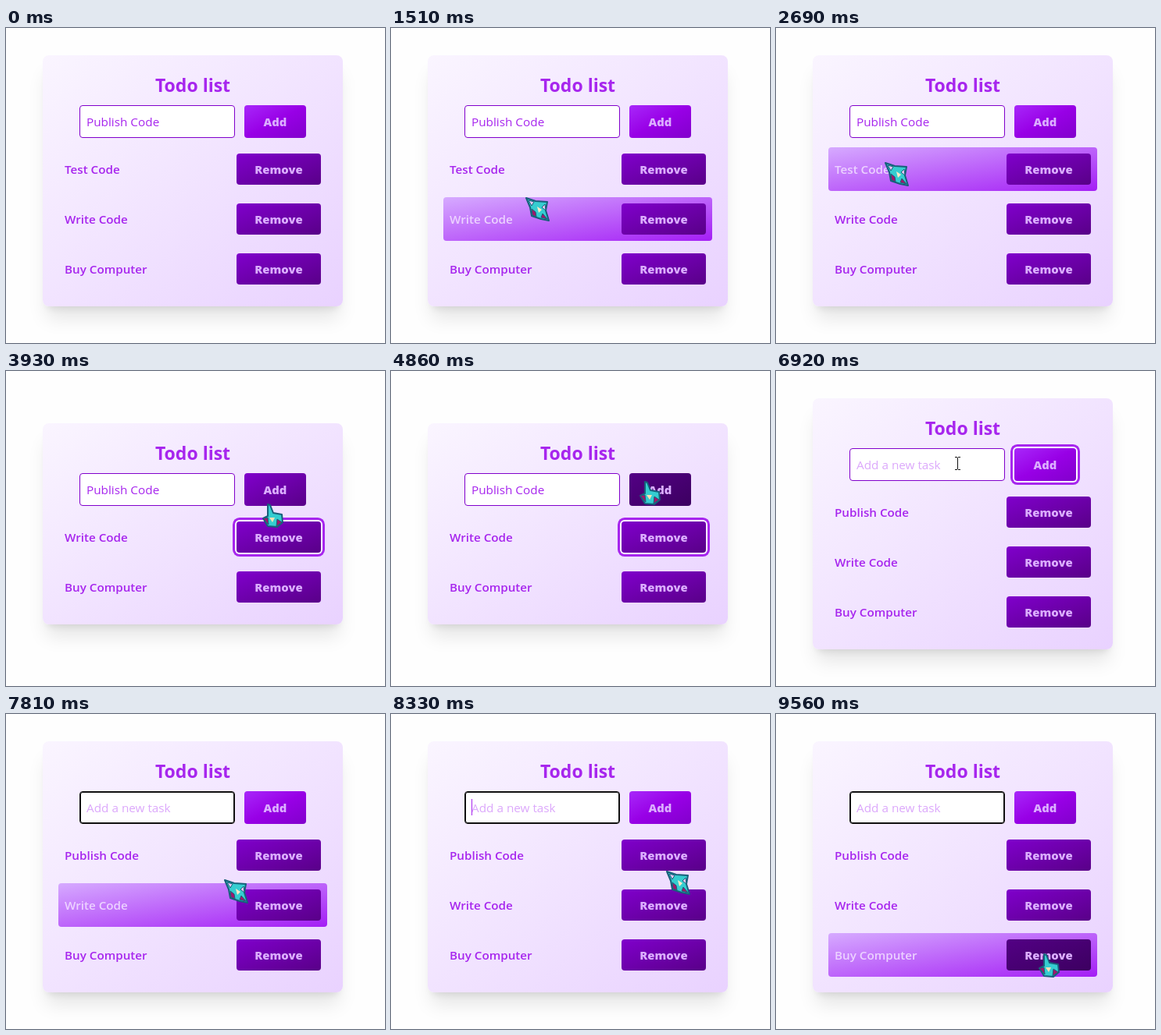
An HTML page for the animation above (9.86 s loop, 485 px wide and 404 px high).

```html
<!DOCTYPE html>
<html lang="en">
<head>
<meta charset="utf-8">
<title>Todo list</title>
<style>
html, body { margin: 0; width: 100%; height: 100%; overflow: hidden; background: #fefefe; }
body { position: relative; font: 600 15.2px "Open Sans", "Noto Sans", sans-serif; color: #a726ee; cursor: none; }
#card { position: absolute; left: 47px; width: 384px; border-radius: 8px;
  background: linear-gradient(to bottom right, #faf5ff, #e9d2ff);
  box-shadow: 0 20px 25px -5px rgba(0,0,0,.1), 0 8px 10px -6px rgba(0,0,0,.1); }
#card * { position: absolute; box-sizing: border-box; white-space: nowrap; }
h1 { margin: 0; top: 18px; width: 100%; line-height: 40px; text-align: center; font-size: 23px; font-weight: 700; }
#field { left: 47px; top: 64px; width: 199px; height: 42px; padding-left: 8px; line-height: 40px;
  border: 1px solid #8000cc; border-radius: 4px; background: #fff; font-size: 15.3px; font-weight: 400; }
#field.empty { color: #dca8fb; }
#field.focus { border-color: #101010; box-shadow: inset 0 0 0 1px #101010; }
.btn { border-radius: 4px; text-align: center; font-size: 14.8px; font-weight: 800; color: #dbaeff;
  background: linear-gradient(to bottom right, #8000cc, #590088); }
.btn.hover { background: linear-gradient(to bottom right, #530085, #3c0060); }
.btn.off { background: linear-gradient(to bottom right, #a827fa, #9800e6 50%, #8200cc); }
.btn.ring { box-shadow: 0 0 0 2px #fff, 0 0 0 5px #a726ee; }
#add { left: 258px; top: 64px; width: 79px; height: 42px; line-height: 43px; }
.row { left: 20px; width: 344px; height: 56px; border-radius: 4px; line-height: 56px; }
.row.hover { background: linear-gradient(to bottom right, #d6aaff, #a41ef5); color: #ecd2ff; }
.label { left: 8px; }
.row .btn { left: 228px; top: 8px; width: 108px; height: 40px; line-height: 41px; }
#caret { position: absolute; width: 1px; height: 21px; background: currentColor; pointer-events: none; }
#cursor { position: absolute; left: 0; top: 0; overflow: visible; pointer-events: none; }
</style>
</head>
<body>
<div id="card">
  <h1>Todo list</h1>
  <div id="field"></div>
  <div id="add" class="btn">Add</div>
</div>
<div id="caret"></div>
<svg id="cursor" width="32" height="32">
  <g id="arrow" transform="translate(-9 -9)" stroke="#17607a" stroke-linejoin="round">
    <path d="M1 1L13 5L28 6L26 17L30 30L20 28L8 24L6 13Z" fill="#35cdd0" stroke-width="2"/>
    <path d="M4 4L11 6L8 11ZM25 9L26 17L21 13Z" fill="#e6c8f4"/>
    <path d="M8 15L13 19L14 25L9 23ZM22 21L28 28L20 26Z" fill="#a3166a"/>
    <path d="M15 12L21 16L17 20Z" fill="#ffe9c4" stroke="none"/>
  </g>
  <g id="hand" transform="translate(-9 -9)" stroke="#17607a" stroke-linejoin="round">
    <path d="M8 1L11 2L15 12L26 14L27 24L20 30L8 29L2 19L8 16Z" fill="#35cdd0" stroke-width="2"/>
    <path d="M2 19L8 18L9 27ZM20 20L26 24L19 29Z" fill="#a3166a"/>
    <path d="M10 18L17 18L14 24Z" fill="#ffe2b4" stroke="none"/>
  </g>
  <path id="beam" d="M-3 -7.5H0M1 -7.5H4M.5 -7V8M-3 8.5H0M1 8.5H4" stroke="#111" fill="none"/>
</svg>
<script>
const LOOP = 9860, ENTER = 560, REMOVED = 3770, ADDED = 5300, FOCUSED = 7060;
const BLINK = 500, EDITED = 2730;
const $ = id => document.getElementById(id);
const card = $('card'), field = $('field'), add = $('add'), caret = $('caret'), cursor = $('cursor');

// Where the mouse rests: arrival, departure, x, y
const stops = [
  [0, ENTER, 500, 272],
  [1090, 1270, 190, 190],
  [1510, 1510, 181, 226],
  [1770, 2240, 185, 208],
  [EDITED, EDITED, 147, 181],
  [3030, 3960, 336, 179],
  [4860, 5400, 326, 150],
  [5790, 6180, 238, 126],
  [6560, 6560, 190, 230],
  [6920, 7530, 232, 118],
  [8080, 8080, 340, 318],
  [8330, 8520, 361, 210],
  [9230, LOOP, 344, 316]
];

function make(cls, parent, text = '') {
  const el = document.createElement('div');
  el.className = cls;
  el.textContent = text;
  return parent.appendChild(el);
}

const rows = [0, 1, 2].map(i => {
  const row = make('row', card);
  row.style.top = 118 + 64 * i + 'px';
  return { row, label: make('label', row), button: make('btn', row, 'Remove') };
});

const show = (el, on) => { el.style.display = on ? '' : 'none'; };
const ease = k => k * k * (3 - 2 * k);

function pointerAt(t) {
  const next = stops.findIndex(([, leave]) => leave > t);
  const [arrive, , x, y] = stops[next];
  if (t >= arrive) return [x, y];
  const [, left, x0, y0] = stops[next - 1];
  const k = ease((t - left) / (arrive - left));
  return [x0 + (x - x0) * k, y0 + (y - y0) * k];
}

function layout(t) {
  const items = ['Write Code', 'Buy Computer'];
  if (t < REMOVED) items.unshift('Test Code');
  else if (t >= ADDED) items.unshift('Publish Code');
  rows.forEach(({ row, label }, i) => {
    show(row, i < items.length);
    label.textContent = items[i] || '';
  });
  const height = 130 + 64 * items.length;
  card.style.height = height + 'px';
  card.style.top = 196 - height / 2 + 'px';

  field.textContent = t < ADDED ? 'Publish Code' : 'Add a new task';
  field.classList.toggle('empty', t >= ADDED);
  field.classList.toggle('focus', t >= FOCUSED);
  add.classList.toggle('off', items.length === 3);
  add.classList.toggle('ring', t >= ADDED && t < FOCUSED);
  rows[0].button.classList.toggle('ring', t >= REMOVED && t < ADDED);
}

function drawCaret(t) {
  const editing = t >= EDITED && t < EDITED + BLINK;
  const typing = t >= FOCUSED && (t - FOCUSED) % (2 * BLINK) < BLINK;
  show(caret, editing || typing);
  caret.style.left = (editing ? 144 : 103) + 'px';
  caret.style.top = (editing ? 170 : 109) + 'px';
}

function drawCursor(t) {
  const [x, y] = pointerAt(t);
  // After the removal nothing is hovered until the mouse moves again
  const waiting = t >= REMOVED && t <= 3960;
  const hit = waiting ? null : document.elementFromPoint(x, y);
  const button = hit && hit.closest('.btn:not(.off)');
  const row = hit && hit.closest('.row');
  for (const el of [add, ...rows.flatMap(r => [r.row, r.button])])
    el.classList.toggle('hover', el === button || el === row);

  const shape = waiting || button ? 'hand' : hit === field ? 'beam' : 'arrow';
  for (const id of ['arrow', 'hand', 'beam']) show($(id), id === shape);
  show(cursor, t >= ENTER);
  cursor.style.transform = `translate(${Math.round(x)}px, ${Math.round(y)}px)`;
}

function frame() {
  const t = performance.now() % LOOP;
  layout(t);
  drawCaret(t);
  drawCursor(t);
  requestAnimationFrame(frame);
}
frame();
</script>
</body>
</html>
```
